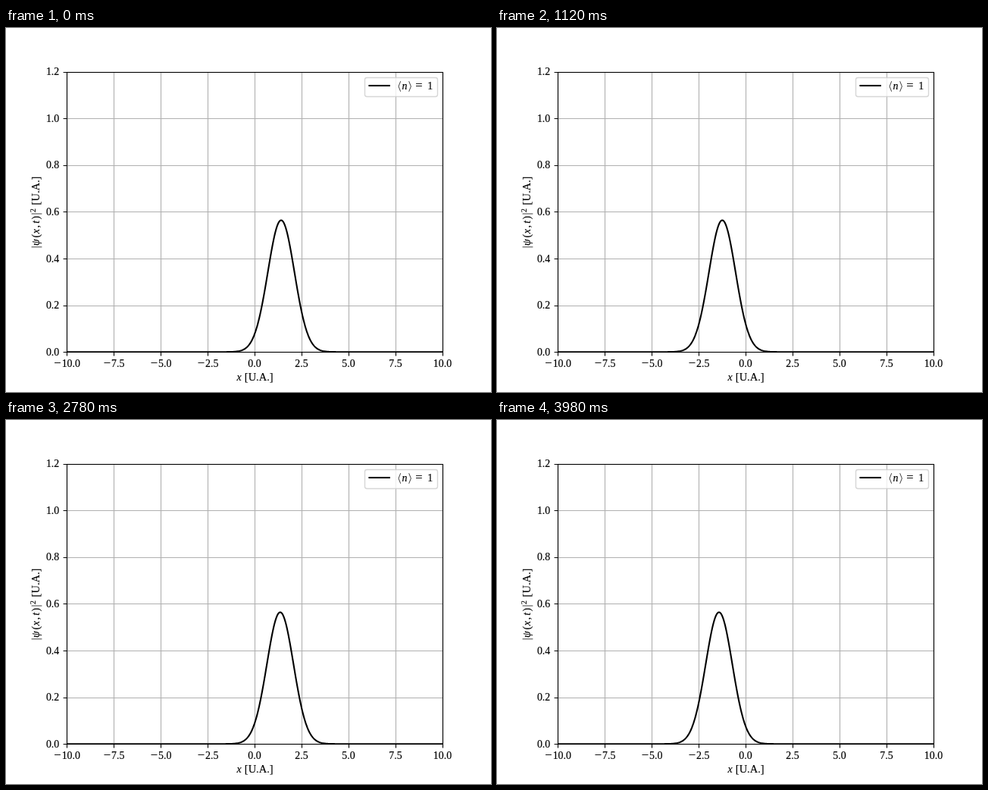
Write an HTML page that moves like this. It is 640 px wide and 480 px high and loops after 4020 ms.

```html
<!DOCTYPE html>
<html lang="en">
<head>
<meta charset="utf-8">
<title>Coherent state</title>
<style>
  html, body { margin: 0; width: 100%; height: 100%; overflow: hidden; background: #fff; }
  svg { display: block; }
  text { font-family: "Liberation Serif", "Times New Roman", serif; font-size: 13.9px; stroke: #000; stroke-width: .15px; }
  .sign { font-size: 16.5px; text-anchor: middle; }
  .caps { font-size: 14.5px; }
  .sup { font-size: 9.8px; }
  .it { font-style: italic; }
  .end { text-anchor: end; }
  .line { fill: none; stroke: #000; stroke-width: 2.08; stroke-linejoin: round; }
  .thin { fill: none; stroke: #000; stroke-width: 1.11; }
  .grid { stroke: #b0b0b0; }
  .fine { fill: none; stroke: #000; stroke-width: .75; }
</style>
</head>
<body>
<svg width="640" height="480" viewBox="0 0 640 480">
  <clipPath id="plot"><rect x="80" y="58" width="496" height="370"/></clipPath>
  <path id="grid" class="thin grid"/>
  <path id="ticks" class="thin"/>
  <g clip-path="url(#plot)"><path id="curve" class="line"/></g>
  <rect class="thin" x="80.5" y="58.5" width="496" height="369"/>
  <g id="labels"></g>

  <g>
    <text class="it" x="304.4" y="465">x</text>
    <text class="caps" x="314.8" y="465">[U.A.]</text>
  </g>

  <g transform="translate(44 291) rotate(-90)">
    <path class="fine" d="M2.2 -10.4V3.4M46 -10.4V3.4"/>
    <text class="it" x="4" y="0">ψ</text>
    <text x="14.4" y="0">(</text>
    <text class="it" x="19.8" y="0">x</text>
    <text x="27.6" y="0">,</text>
    <text class="it" x="33.2" y="0">t</text>
    <text x="38.4" y="0">)</text>
    <text class="sup" x="48" y="-5">2</text>
    <text class="caps" x="57.6" y="0">[U.A.]</text>
  </g>

  <g>
    <rect x="473.5" y="65.5" width="96" height="25" rx="2.8" fill="#fff" fill-opacity=".8"
      stroke="#ccc" stroke-opacity=".8" stroke-width="1.39"/>
    <path class="line" d="M478.4 76H506.9"/>
    <path class="fine" d="M520.7 70.2L518 77L520.7 83.8M531.7 70.2L534.4 77L531.7 83.8"/>
    <text class="it" x="522.6" y="80.5">n</text>
    <text class="sign" x="545" y="81.2">=</text>
    <text x="556.3" y="80.5">1</text>
  </g>
</svg>
<script>
  const $ = id => document.getElementById(id);
  const EM = 13.89, UNIT = 24.8, HEIGHT = 308, BASE = 427.2;
  const LOOP = 4020, STEP = 20, STEPS = 200;
  const snap = v => Math.floor(v + 0.5) + 0.5;

  function label(text, x, y, cls) {
    const el = document.createElementNS("http://www.w3.org/2000/svg", "text");
    el.setAttribute("x", x);
    el.setAttribute("y", y);
    el.setAttribute("class", cls);
    el.textContent = text;
    $("labels").append(el);
  }

  let grid = "", ticks = "";
  for (let v = -10; v <= 10; v += 2.5) {
    const x = 328 + v * UNIT, px = snap(x);
    grid += `M${px} 58V428`;
    ticks += `M${px} 428V432.4`;
    const text = Math.abs(v).toFixed(1);
    const width = (0.5 * (text.length - 1) + 0.25) * EM;
    const minus = v < 0 ? 0.833 * EM : 0;
    const right = x + (width + minus) / 2;
    label(text, right, 446.5, "end");
    if (minus) label("−", right - width - minus / 2, 447.1, "sign");
  }
  for (let i = 0; i <= 6; i++) {
    const y = BASE - i * 0.2 * HEIGHT, py = snap(y);
    grid += `M80 ${py}H576`;
    ticks += `M80 ${py}H75.6`;
    label((i * 0.2).toFixed(1), 70.3, Math.round(y + 4.6), "end");
  }
  $("grid").setAttribute("d", grid);
  $("ticks").setAttribute("d", ticks);

  // Gaussian density about the origin, wide enough to slide sideways
  const points = [];
  for (let x = -12; x <= 12.001; x += 0.04) {
    const density = Math.exp(-x * x) / Math.sqrt(Math.PI);
    points.push(`${(328 + x * UNIT).toFixed(2)} ${(BASE - density * HEIGHT).toFixed(2)}`);
  }
  $("curve").setAttribute("d", "M" + points.join("L"));

  // One and a half oscillations per loop, then a jump back
  function draw() {
    const k = Math.floor((performance.now() % LOOP) / STEP);
    const mean = Math.SQRT2 * Math.cos(3 * Math.PI * k / STEPS);
    $("curve").setAttribute("transform", `translate(${mean * UNIT} 0)`);
    requestAnimationFrame(draw);
  }
  draw();
</script>
</body>
</html>
```
